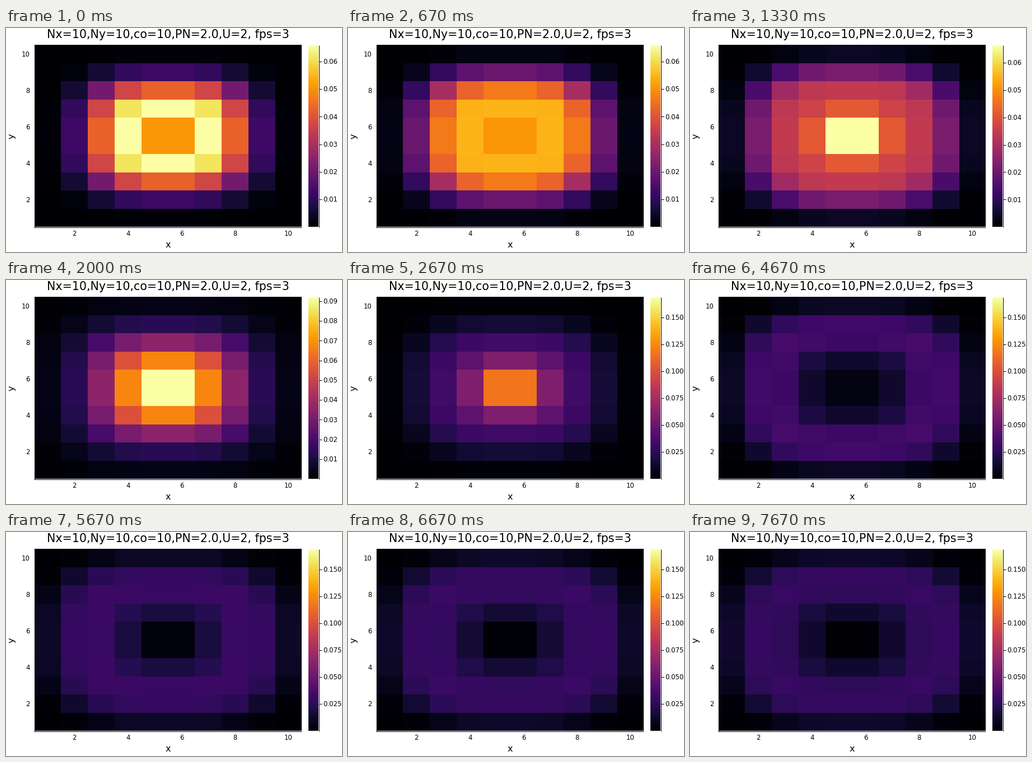
Animation, 600 px wide and 400 px high, one loop 8 s. Source, as a matplotlib script:

```python
import numpy as np
import matplotlib.pyplot as plt
from matplotlib.animation import FuncAnimation

W, H, DPI = 600, 400, 100
LOOP_MS, STEPS, INTERVAL = 8000, 24, 40
LEFT, RIGHT, TOP, BOTTOM = 50.7, 528.3, 30.25, 355.25
BAR_LEFT, BAR_RIGHT = 540, 558
N = 10

# Colour limit and tick spacing from a given step on.
LIMITS = [(0, 0.0659, 0.01), (4, 0.06635, 0.01), (6, 0.092, 0.01), (7, 0.16875, 0.025)]

# step: ring height (x 1000), ring radius, ring width, core height (x 1000), core width
CLOUD = {
    0: (66, 1.45, 1.6, 0, 1.4),
    4: (31, 2.7, 1.45, 75, 1.46),
    6: (0, 2.6, 1.4, 98, 2.48),
    7: (25, 2.5, 1.3, 206, 1.34),
    10: (40, 2.1, 1.85, 0, 1.3),
    14: (36.5, 3.15, 1.6, 4, 1),
    17: (32, 3.0, 2.0, -6, 1),
    23: (30.5, 3.3, 2.0, -6, 1),
}

# Rounded-square distance from the middle, and the fall-off near the walls.
offset = np.abs(np.arange(N) - (N - 1) / 2)
R = np.cbrt(offset[:, None] ** 3 + offset ** 3)
WALL = 1 / (1 + np.exp(3 * (R - 4.7)))


def limit_at(step):
    return [(top, gap) for start, top, gap in LIMITS if step >= start][-1]


def density(step):
    ring, radius, width, core, spread = (
        np.interp(step, list(CLOUD), column) for column in zip(*CLOUD.values()))
    cloud = ring * np.exp(-((R - radius) / width) ** 2) * WALL
    cloud += core * np.exp(-(R / spread) ** 2)
    return np.maximum(cloud, 0) / 1000


fig = plt.figure(figsize=(W / DPI, H / DPI), dpi=DPI, facecolor="white")
ax = fig.add_axes([0, 0, 1, 1])
ax.set(xlim=(0, W), ylim=(H, 0))
ax.axis("off")


def mesh(xs, ys, values):
    return ax.pcolormesh(xs, ys, values, cmap="inferno", antialiased=False)


def line(xs, ys):
    return ax.plot(xs, ys, color="black", lw=0.72, solid_capstyle="butt", zorder=3)[0]


def label(x, y, text, size=8.5, ha="center", **kw):
    return ax.text(x, y, text, size=size, ha=ha, va="baseline",
                   family="DejaVu Sans", color="black", **kw)


heat = mesh(np.round(np.linspace(LEFT, RIGHT, N + 1)),
            np.round(np.linspace(TOP, BOTTOM, N + 1)), density(0))
mesh([BAR_LEFT, BAR_RIGHT], np.linspace(31, 355, 257), np.linspace(1, 0, 256)[:, None])

line([50, 528], [355.5, 355.5])
line([50.5, 50.5], [30, 356])
line([558.5, 558.5], [31, 356])

label(289.5, 18, "Nx=10,Ny=10,co=10,PN=2.0,U=2, fps=3", size=14.85)
label(289.5, 391.5, "x", size=11.7)
label(15, 193, "y", size=11.7, rotation=90, rotation_mode="anchor")
for n in range(2, N + 1, 2):
    label(LEFT + (n - 0.5) * (RIGHT - LEFT) / N, 371, str(n))
    label(42.5, BOTTOM - (n - 0.5) * (BOTTOM - TOP) / N + 4.3, str(n), ha="right")

ticks = [(line([], []), label(566.5, 0, "", ha="left")) for _ in range(9)]


def update(frame):
    step = int(((frame + 1) * INTERVAL - 1) * STEPS / LOOP_MS)
    top, gap = limit_at(step)
    heat.set_array(density(step))
    heat.set_clim(0, top)
    digits = 2 if gap == 0.01 else 3
    for k, (mark, text) in enumerate(ticks, 1):
        value = k * gap
        y = BOTTOM - value / top * (BOTTOM - TOP - 0.5)
        mark.set_data([558.5, 564], [y, y])
        text.set_y(y + 4.3)
        text.set_text(f"{value:.{digits}f}")
        mark.set_visible(value <= top)
        text.set_visible(value <= top)
    return []


anim = FuncAnimation(fig, update, frames=LOOP_MS // INTERVAL, interval=INTERVAL,
                     repeat=True, repeat_delay=0, blit=False)
plt.show()
```
